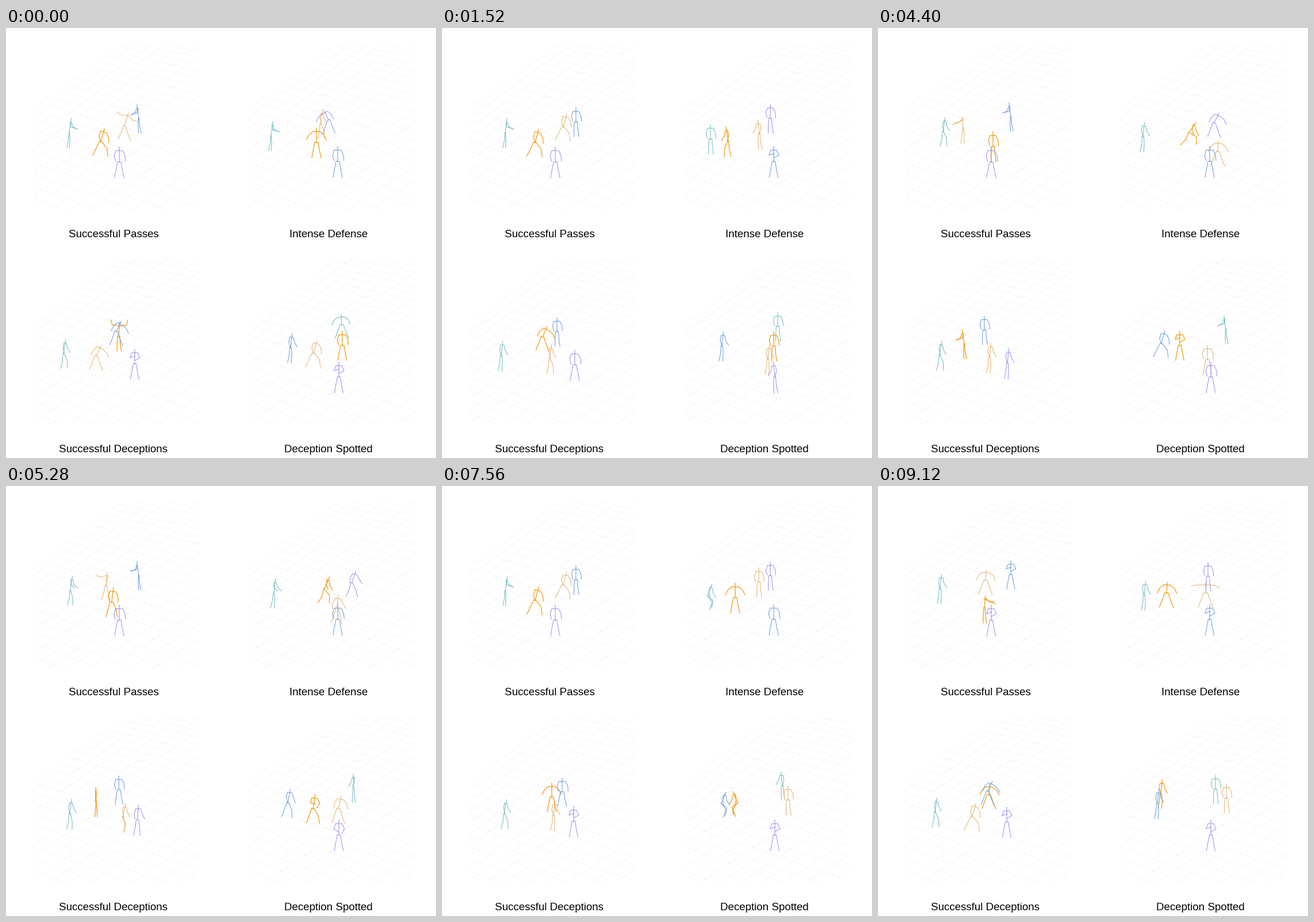
Write a matplotlib script that moves like this. It is 748x748 px and loops after 9200 ms.

```python
import numpy as np
import matplotlib.pyplot as plt
from matplotlib.animation import FuncAnimation
from matplotlib.patches import Polygon

SIZE, DPI, STEP, FRAMES = 748, 68, 40, 230
PX = 72 / DPI
TIMES = np.array([0, 1520, 3000, 4400, 6200, 7560, 9120], float)
TEAL, TAN, ORANGE = "#7cc0c5", "#e6b878", "#f5a122"
BLUE, PURPLE = "#72a4e4", "#a398f0"

# limb angles in degrees from straight down: upper and lower left, upper and lower right
ARMS = dict(
    hang=(-18, 15, 25, 5),
    swing=(-12, 15, 12, 30),
    forward=(10, 75, 20, 65),
    reach=(60, 85, 45, 80),
    out=(-50, -25, 50, 25),
    spread=(-90, -80, 85, 60),
    raised=(-100, -165, 100, 170),
    point=(-95, -125, 40, 75),
    folded=(-20, 110, 25, -60),
)
LEGS = dict(
    stand=(-11, -10, 9, 12),
    narrow=(-4, 0, 4, 8),
    side=(-4, -12, 3, -4),
    step=(-3, -14, 24, 2),
    wide=(-20, -22, 18, 22),
    squat=(-26, -26, 36, 8),
    run=(-20, -45, 62, 3),
    crouch=(50, -10, 32, -20),
)
# lean, trunk height, half-width of the shoulders, arms, legs
STANCES = dict(
    front=(0, 1, 6, "hang", "stand"),
    idle=(0, 1, 5, "hang", "narrow"),
    guard=(0, 1, 5, "folded", "stand"),
    brace=(0, 1, 6, "out", "stand"),
    side=(8, 1, 1, "forward", "side"),
    turn=(6, 1, 3, "swing", "side"),
    walk=(9, 1, 2, "swing", "step"),
    aim=(17, 1, 3, "point", "wide"),
    reach=(5, 0.8, 2, "reach", "narrow"),
    raise_=(4, 1, 4, "raised", "narrow"),
    wide=(4, 0.75, 6, "out", "wide"),
    open=(0, 0.75, 7, "spread", "wide"),
    squat=(15, 0.95, 5, "hang", "squat"),
    lunge=(25, 0.8, 5, "out", "wide"),
    run=(35, 0.85, 2, "swing", "run"),
    crouch=(22, 0.85, 2, "swing", "crouch"),
)

fig = plt.figure(figsize=(SIZE / DPI, SIZE / DPI), dpi=DPI, facecolor="white")
ax = fig.add_axes([0, 0, 1, 1])
ax.set_xlim(0, SIZE)
ax.set_ylim(SIZE, 0)
ax.axis("off")


def floor(ox, oy):
    """Faint perspective grid, cut to the visible part of the court."""
    area = [(48, 139), (200, 28), (336, 28), (336, 317), (48, 317)]
    clip = Polygon([(x + ox, y + oy) for x, y in area], fc="none", ec="none")
    ax.add_patch(clip)
    rows = [(30 + 10 * k + 0.32 * k * k, 0.2 + 0.008 * k) for k in range(23)]
    cols = [(139 + 17 * j + 0.25 * j * j, -0.73 + 0.006 * j) for j in range(25)]
    lines = [(y - 288 * s, y) for y, s in rows] + [(y, y + 288 * s) for y, s in cols]
    for a, b in lines:
        line, = ax.plot([48 + ox, 336 + ox], [a + oy, b + oy], color="#f2f2f2",
                        lw=0.8 * PX, dashes=(5, 2), zorder=0)
        line.set_clip_path(clip)


captions = ("Successful Passes", "Intense Defense",
            "Successful Deceptions", "Deception Spotted")
for n, caption in enumerate(captions):
    dx, dy = 375 * (n % 2), 374 * (n // 2)
    floor(dx, dy)
    ax.text(187 + dx * 0.998, 364 + dy, caption, ha="center", va="baseline",
            family="Liberation Sans", size=18.8 * PX, color="black")


def stance(name):
    """Named stance as numbers; a leading minus mirrors it."""
    lean, tall, width, arms, legs = STANCES[name.lstrip("-")]
    a, b = np.array(ARMS[arms]), np.array(LEGS[legs])
    if name[0] == "-":
        lean, a, b = -lean, -np.roll(a, 2), -np.roll(b, 2)
    return [lean, tall, width, *a, *b]


def toward(angle, length):
    r = np.radians(angle)
    return length * np.array([np.sin(r), np.cos(r)])


def limb(start, upper, lower, length):
    knee = start + toward(upper, length)
    return [start, knee, knee + toward(lower, length)]


def skeleton(p):
    hip, (lean, tall, width), arms, legs = p[:2], p[2:5], p[5:9], p[9:]
    scale = 0.92 + 0.0011 * (hip[1] % 374 - 157)
    head = hip - toward(-lean, 26 * scale * tall)
    neck = head + 0.25 * (hip - head)
    side = toward(90 - lean, 1)
    gap = np.full((1, 2), np.nan)

    def pair(centre, half, angles, length):
        left = limb(centre - half * side, *angles[:2], length)
        right = limb(centre + half * side, *angles[2:], length)
        return left[::-1] + right

    return np.vstack([head, hip, gap, pair(neck, width, arms, 9.5 * scale), gap,
                      pair(hip, 0.5 * width, legs, 14 * scale)])


class Actor:
    """Walks through hip points, taking one stance at each; short lists repeat."""

    def __init__(self, color, stances, *points):
        names = stances.split()
        self.keys = np.array([[*points[k % len(points)], *stance(names[k % len(names)])]
                              for k in range(len(TIMES))])
        self.slopes = 0.5 * np.gradient(self.keys, TIMES, axis=0)
        lw = 1.35 if color == ORANGE else 1.1
        self.line, = ax.plot([], [], color=color, lw=lw * PX, solid_joinstyle="round")

    def pose(self, t):
        k = min(np.searchsorted(TIMES, t, side="right") - 1, len(TIMES) - 2)
        span = TIMES[k + 1] - TIMES[k]
        u = (t - TIMES[k]) / span
        a, b = self.keys[k:k + 2]
        p = a + (b - a) * u * u * (3 - 2 * u)
        p += span * u * (1 - u) * ((1 - u) * self.slopes[k] - u * self.slopes[k + 1])
        # stride grows with the distance covered
        stride = min(18, np.hypot(*(b - a)[:2]) / 2) * np.sin(4 * np.pi * u)
        p[9:] += stride * np.array([1, 1, -1, -1])
        p[5:9] -= stride * np.array([1, 1, -1, -1]) / 2
        return p

    def draw(self, t):
        self.line.set_data(*skeleton(self.pose(t)).T)


actors = [
    # Successful Passes: the same drill over again
    Actor(TEAL, "side side turn walk",
          (110, 182), (110, 182), (108, 178), (113, 180)),
    Actor(TAN, "aim squat wide -reach",
          (206, 170), (211, 172), (187, 164), (148, 174)),
    Actor(ORANGE, "squat squat reach idle",
          (165, 198), (162, 199), (185, 211), (200, 206)),
    Actor(BLUE, "-side idle guard -side",
          (231, 157), (233, 163), (231, 154), (231, 154)),
    Actor(PURPLE, "front front guard front", (197, 233)),

    # Intense Defense
    Actor(TEAL, "side idle turn turn side crouch turn",
          (461, 187), (467, 193), (457, 187), (461, 189),
          (470, 184), (462, 191), (463, 190)),
    Actor(TAN, "walk -turn wide wide turn idle open",
          (547, 167), (552, 185), (577, 208), (591, 215),
          (558, 205), (551, 167), (570, 186)),
    Actor(ORANGE, "brace -walk wide run turn brace wide",
          (540, 199), (498, 197), (513, 182), (541, 182),
          (560, 178), (510, 194), (502, 186)),
    Actor(BLUE, "front guard guard front front front guard", (577, 232)),
    Actor(PURPLE, "-lunge idle idle lunge walk idle idle",
          (561, 160), (571, 157), (575, 159), (585, 165),
          (614, 170), (571, 156), (574, 157)),

    # Successful Deceptions
    Actor(TEAL, "walk turn walk walk turn walk walk",
          (100, 566), (103, 570), (104, 571), (107, 569),
          (114, 571), (108, 570), (99, 567)),
    Actor(TAN, "lunge walk crouch turn crouch turn squat",
          (157, 570), (187, 575), (194, 578), (194, 573),
          (211, 578), (194, 573), (164, 575)),
    Actor(ORANGE, "raise_ lunge lunge -side side brace wide",
          (196, 536), (175, 537), (191, 540), (150, 549),
          (170, 548), (191, 541), (193, 537)),
    Actor(BLUE, "lunge idle front idle front front lunge",
          (192, 528), (200, 528), (214, 536), (185, 525),
          (211, 533), (209, 532), (191, 531)),
    Actor(PURPLE, "guard front guard turn front guard guard",
          (224, 584), (231, 586), (232, 582), (225, 583),
          (233, 578), (229, 583), (224, 584)),

    # Deception Spotted
    Actor(TEAL, "-wide idle front -side turn -turn idle",
          (584, 516), (584, 519), (601, 527), (605, 524),
          (603, 525), (592, 521), (587, 527)),
    Actor(TAN, "squat turn front front lunge idle idle",
          (535, 566), (567, 576), (559, 590), (573, 577),
          (584, 545), (602, 546), (606, 543)),
    Actor(ORANGE, "front idle wide guard squat -crouch turn",
          (585, 552), (577, 553), (530, 559), (525, 552),
          (542, 570), (514, 551), (492, 535)),
    Actor(BLUE, "turn turn idle squat turn crouch turn",
          (495, 556), (487, 553), (488, 548), (493, 549),
          (487, 553), (486, 552), (486, 552)),
    Actor(PURPLE, "guard -turn guard front guard guard guard", (579, 607)),
]


def update(i):
    t = min(i * STEP, TIMES[-1])
    for actor in actors:
        actor.draw(t)
    return [actor.line for actor in actors]


anim = FuncAnimation(fig, update, frames=FRAMES, interval=STEP, repeat=True,
                     repeat_delay=0, blit=True, init_func=lambda: update(0))
plt.show()
```
